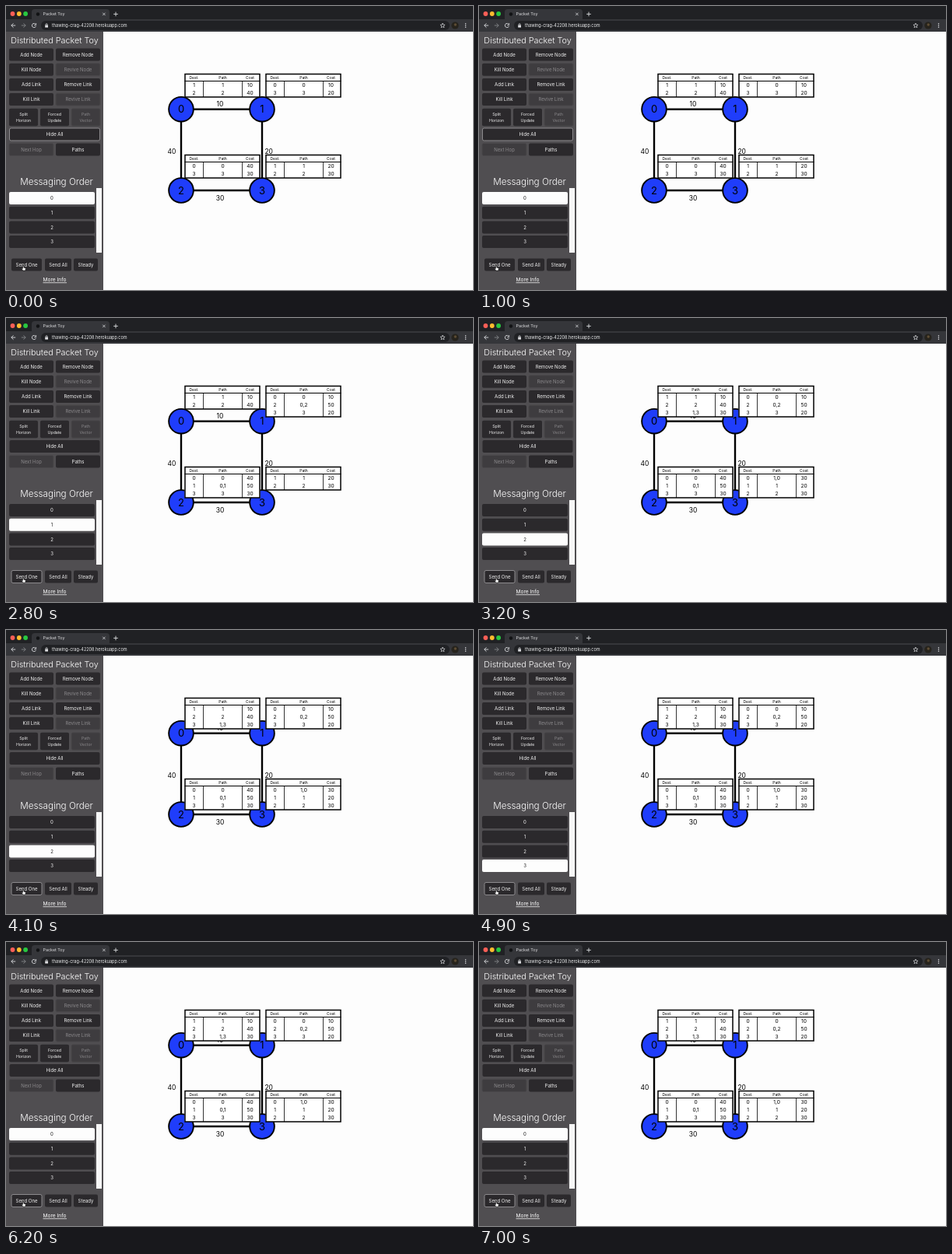
Recreate the animation shown at these times as an HTML page with a canvas. Size 600 by 365 pixels, loop 7100 ms.

```html
<!DOCTYPE html>
<html lang="en">
<head>
<meta charset="utf-8">
<title>Packet Toy</title>
<style>
html, body { margin: 0; width: 100%; height: 100%; overflow: hidden; background: #fdfdfd; }
canvas { display: block; width: 600px; height: 365px; }
</style>
</head>
<body>
<canvas id="stage"></canvas>
<script>
const W = 600, H = 365, LOOP = 7100;
const SENDS = [1400, 2900, 4400, 5900]; // click times of "Send One"
const RING_ON = 1500;
const canvas = document.getElementById('stage');
const ctx = canvas.getContext('2d');
const ratio = window.devicePixelRatio || 1;
canvas.width = W * ratio;
canvas.height = H * ratio;

function rect(x, y, w, h, color) {
  ctx.fillStyle = color;
  ctx.fillRect(x, y, w, h);
}

function rounded(x, y, w, h, r, fill, stroke) {
  ctx.beginPath();
  ctx.roundRect(x, y, w, h, r);
  if (fill) { ctx.fillStyle = fill; ctx.fill(); }
  if (stroke) { ctx.strokeStyle = stroke; ctx.lineWidth = 1; ctx.stroke(); }
}

function disc(x, y, r, fill) {
  ctx.beginPath();
  ctx.arc(x, y, r, 0, Math.PI * 2);
  ctx.fillStyle = fill;
  ctx.fill();
}

function path(points, color, width) {
  ctx.beginPath();
  points.forEach(([x, y], i) => i ? ctx.lineTo(x, y) : ctx.moveTo(x, y));
  ctx.strokeStyle = color;
  ctx.lineWidth = width;
  ctx.stroke();
}

function text(str, x, y, size, color = '#000', align = 'center', weight = 400) {
  ctx.font = `${weight} ${size}px Inter, "Liberation Sans", sans-serif`;
  ctx.textAlign = align;
  ctx.textBaseline = 'alphabetic';
  ctx.fillStyle = color;
  ctx.fillText(str, x, y + size * 0.36);
}

function drawBrowser() {
  rect(0, 0, W, 33, '#202124');
  ['#ff5f57', '#febc2e', '#28c840'].forEach((c, i) => disc(8.5 + i * 8.3, 10, 2.9, c));
  rounded(33, 4, 100, 16, 4, '#35363a');
  rect(0, 17, W, 16, '#35363a');
  disc(41, 10.5, 2.2, '#111214');
  text('Packet Toy', 47.5, 10.5, 5.4, '#dedfe1', 'left');
  const light = '#dcdde0';
  path([[124.2, 8.7], [127.6, 12.1]], light, 0.8);
  path([[127.6, 8.7], [124.2, 12.1]], light, 0.8);
  path([[138.2, 10.4], [143.8, 10.4]], light, 0.9);
  path([[141, 7.6], [141, 13.2]], light, 0.9);

  const arrow = (x, dir, color) => {
    path([[x - 2.7, 25], [x + 2.7, 25]], color, 0.9);
    path([[x, 25 - 2.7], [x + dir * 2.7, 25], [x, 25 + 2.7]], color, 0.9);
  };
  arrow(9.5, -1, light);
  arrow(22.5, 1, '#85868a');
  ctx.beginPath();
  ctx.arc(36, 25, 2.6, 0.3, 5.5);
  ctx.strokeStyle = light;
  ctx.lineWidth = 0.9;
  ctx.stroke();
  path([[38.6, 22], [38.6, 24.5], [36.2, 24.5]], light, 0.8);

  rounded(45, 19, 525, 12, 6, '#202124');
  rect(50.2, 24.4, 3.8, 3.2, light);
  ctx.beginPath();
  ctx.arc(52.1, 24, 1.2, Math.PI, 0);
  ctx.stroke();
  text('thawing-crag-42208.herokuapp.com', 59, 25.2, 5.5, '#eeeff0', 'left');

  const star = [];
  for (let i = 0; i <= 10; i++) {
    const a = -Math.PI / 2 + i * Math.PI / 5, r = i % 2 ? 1.4 : 3.2;
    star.push([561 + r * Math.cos(a), 25.2 + r * Math.sin(a)]);
  }
  path(star, light, 0.7);
  disc(577, 25, 4.6, '#26231c');
  disc(577.3, 24, 1.7, '#5c4c34');
  [-2.3, 0, 2.3].forEach(d => disc(590.5, 25 + d, 0.75, light));
}

function button(label, x, cy, w, { h = 16, off = false, ring = false, on = false, size = 6 } = {}) {
  const fill = on ? '#fdfdfd' : off ? '#3e3c3f' : '#2b292c';
  rounded(x, cy - h / 2, w, h, 2, fill, ring ? '#8c8a8d' : off ? '#4a484b' : null);
  const color = on ? '#222' : off ? '#8b898c' : '#f2f2f2';
  const lines = label.split('\n');
  lines.forEach((s, i) => text(s, x + w / 2, cy + (i - (lines.length - 1) / 2) * 7.8, size, color));
}

function drawHand(x, y) {
  ctx.beginPath();
  ctx.moveTo(x - 1, y - 3.5);
  ctx.lineTo(x + 0.2, y - 3.5);
  ctx.lineTo(x + 0.4, y - 0.8);
  ctx.lineTo(x + 2.8, y - 0.2);
  ctx.lineTo(x + 2.4, y + 3);
  ctx.lineTo(x - 0.7, y + 3);
  ctx.lineTo(x - 2.7, y + 0.3);
  ctx.lineTo(x - 1, y + 0.4);
  ctx.closePath();
  ctx.fillStyle = '#fff';
  ctx.fill();
  ctx.strokeStyle = '#151515';
  ctx.lineWidth = 0.6;
  ctx.stroke();
}

function drawSidebar(t, sent) {
  rect(0, 33, 125, H - 33, '#504e51');
  text('Distributed Packet Toy', 62.5, 44.3, 10.8, '#fff', 'center', 300);
  const rows = [['Add Node', 'Remove Node'], ['Kill Node', 'Revive Node'],
    ['Add Link', 'Remove Link'], ['Kill Link', 'Revive Link']];
  rows.forEach(([left, right], i) => {
    const cy = 62.5 + i * 19.2;
    button(left, 4, cy, 57);
    button(right, 64, cy, 57, { off: i % 2 === 1 });
  });
  ['Split\nHorizon', 'Forced\nUpdate', 'Path\nVector'].forEach((label, i) =>
    button(label, 4 + i * 40, 143, 37, { h: 22.5, size: 5.2, off: i === 2 }));
  button('Hide All', 4.5, 165, 116, { ring: t < SENDS[0] });
  button('Next Hop', 4, 184.5, 57, { off: true });
  button('Paths', 64, 184.5, 57);

  text('Messaging Order', 65, 225.7, 11.7, '#fff', 'center', 300);
  for (let i = 0; i < 4; i++) {
    button(String(i), 4, 247 + i * 18.7, 110, { on: i === sent % 4 });
  }
  rect(116, 234, 7, 83, '#f7f7f7');

  button('Send One', 7, 332.5, 39, { ring: t >= RING_ON });
  button('Send All', 50, 332.5, 34);
  button('Steady', 87, 332.5, 31);
  text('More Info', 62.5, 352, 6.6, '#fff');
  rect(47.5, 355.4, 30.5, 0.7, '#fff');
  drawHand(22.5, 337);
}

function drawTable(x, y, rows) {
  const h = 10 + rows.length * 10;
  rect(x, y, 97, h, '#fff');
  path([[x, y + 9.5], [x + 97, y + 9.5]], '#000', 1);
  [24, 74].forEach(dx => path([[x + dx, y + 9.5], [x + dx, y + h]], '#000', 0.8));
  ctx.lineWidth = 1.5;
  ctx.strokeRect(x + 0.5, y + 0.5, 96, h - 0.5);
  const centers = [12, 49, 84];
  ['Dest.', 'Path', 'Cost'].forEach((s, i) => text(s, x + centers[i], y + 5, 5));
  rows.forEach((row, r) => row.split(' ').forEach((s, i) =>
    text(s, x + centers[i], y + 14.7 + r * 10, 6.6)));
}

function routes(sent) {
  const first = sent >= 1, second = sent >= 2;
  return [
    ['1 1 10', '2 2 40', second && '3 1,3 30'],
    ['0 0 10', first && '2 0,2 50', '3 3 20'],
    ['0 0 40', first && '1 0,1 50', '3 3 30'],
    [second && '0 1,0 30', '1 1 20', '2 2 30']
  ].map(rows => rows.filter(Boolean));
}

function drawNetwork(sent) {
  rect(125, 33, W - 125, H - 33, '#fdfdfd');
  const nodes = [[225, 132.7], [329, 132.7], [225, 237], [329, 237]];
  [[0, 1], [0, 2], [1, 3], [2, 3]].forEach(([a, b]) => path([nodes[a], nodes[b]], '#000', 2.4));
  text('10', 275, 126, 8.5);
  text('40', 213, 186.5, 8.5);
  text('20', 337.7, 186.5, 8.5);
  text('30', 275, 246.7, 8.5);
  nodes.forEach(([x, y], i) => {
    disc(x, y, 16.8, '#000');
    disc(x, y, 14.9, '#1f3dfb');
    text(String(i), x, y, 13);
  });
  const tables = routes(sent);
  nodes.forEach(([x, y], i) => drawTable(x + 4.5, Math.round(y - 45.7), tables[i]));
}

function draw(t) {
  const sent = SENDS.filter(at => t >= at).length;
  ctx.setTransform(ratio, 0, 0, ratio, 0, 0);
  drawNetwork(sent);
  drawSidebar(t, sent);
  drawBrowser();
}

const start = performance.now();
function tick() {
  draw((performance.now() - start) % LOOP);
  requestAnimationFrame(tick);
}
tick();
</script>
</body>
</html>
```
